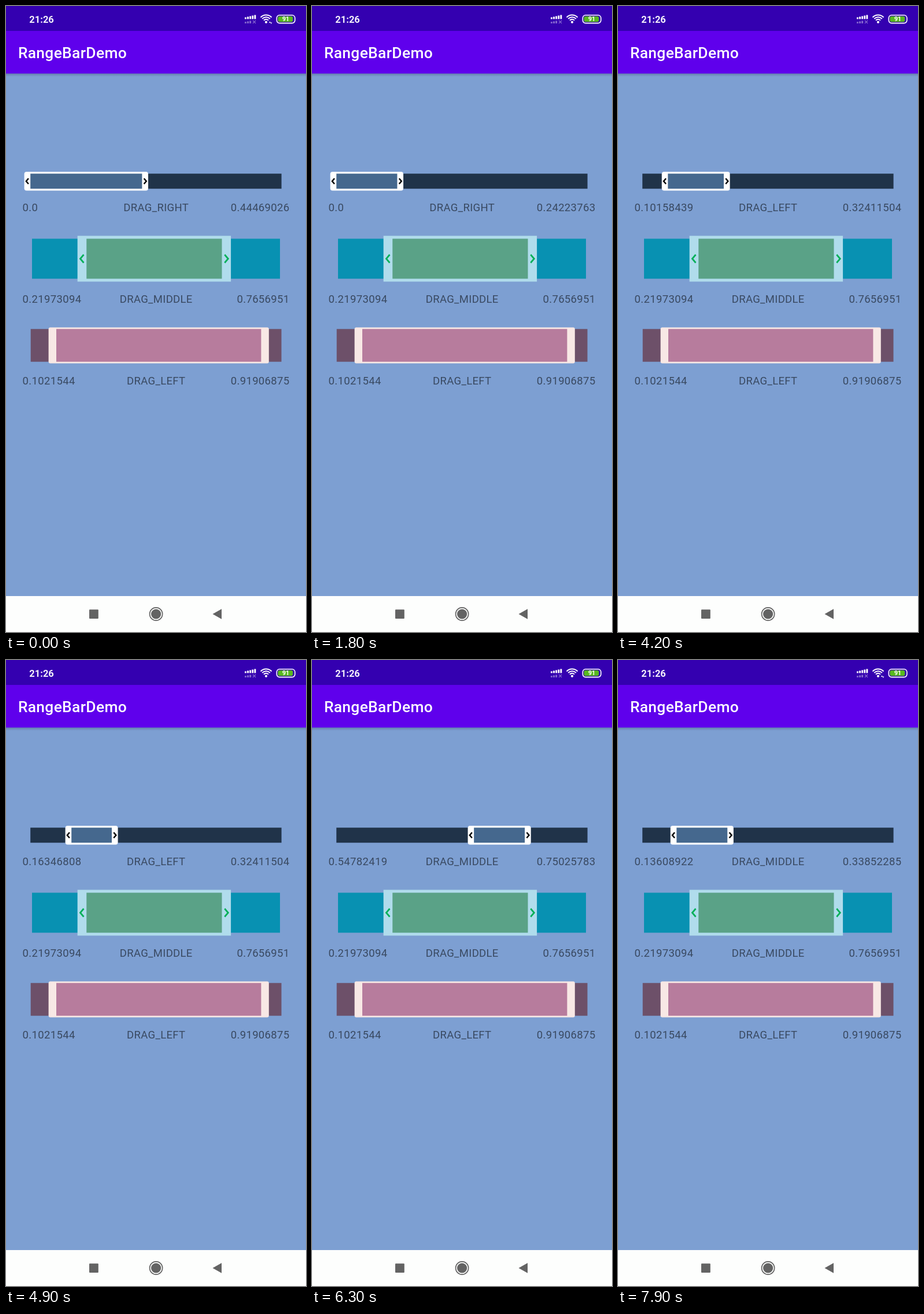
These frames come from a looping animation (519x1080 px, 8000 ms). An HTML page with a canvas:

```html
<!DOCTYPE html>
<html lang="en">
<head>
<meta charset="utf-8">
<title>RangeBarDemo</title>
<style>
html, body { margin: 0; width: 100%; height: 100%; overflow: hidden; background: #7d9fd2; }
canvas { display: block; width: 519px; height: 1080px; }
</style>
</head>
<body>
<canvas id="stage" width="519" height="1080"></canvas>
<script>
const ctx = document.getElementById('stage').getContext('2d');
const LOOP = 8000, STEP = 100;

// Drag path of the first bar: time, low value, high value
const PATH = [
  [0, 0, 0.44469026], [200, 0, 0.44469026],
  [900, 0, 1], [1000, 0, 1],
  [1800, 0, 0.24223763], [2050, 0, 0.17],
  [2700, 0, 0.40634075], [2950, 0, 0.44],
  [3500, 0, 0.32411504], [3600, 0, 0.32411504],
  [4200, 0.10158439, 0.32411504], [4750, 0.17, 0.32411504],
  [5400, 0.12168141, 0.32411504], [5700, 0.22761579, 0.43004942],
  [7000, 0.79756635, 1], [7200, 0.79756635, 1],
  [7900, 0.13608922, 0.33852285]
];

const BARS = [
  { x: 42.2, y: 289.3, w: 434.4, h: 25.9, track: '#203349', fill: '#45688e', frame: '#ffffff',
    grip: 10.6, edge: 3.3, radius: 4, arrow: { color: '#000', dx: 2, dy: 4.7, line: 2.5 }, text: 354 },
  { x: 45, y: 401.5, w: 429, h: 69, track: '#0891b2', fill: '#5aa287', frame: '#b0dcec',
    grip: 15.6, edge: 5, radius: 0, arrow: { color: '#00b058', dx: 3, dy: 7, line: 2.7 }, text: 511.7 },
  { x: 42.7, y: 557.3, w: 433.8, h: 56.4, track: '#6d5069', fill: '#b77c9d', frame: '#f8e8e5',
    grip: 13.4, edge: 2.9, radius: 3, text: 652.8 }
];

function slope(i, col) {
  const rate = k => (PATH[k + 1][col] - PATH[k][col]) / (PATH[k + 1][0] - PATH[k][0]);
  if (i === 0) return 0;
  if (i === PATH.length - 1) return rate(i - 1);
  const a = rate(i - 1), b = rate(i);
  return a * b > 0 ? 2 * a * b / (a + b) : 0;
}

// Monotone cubic through the path points
function valueAt(t, col) {
  let i = 0;
  while (i < PATH.length - 2 && t >= PATH[i + 1][0]) i++;
  const [a, b] = [PATH[i], PATH[i + 1]];
  const d = b[0] - a[0], u = (t - a[0]) / d, v = 1 - u;
  return a[col] * v * v * (1 + 2 * u) + b[col] * u * u * (3 - 2 * u)
    + d * u * v * (slope(i, col) * v - slope(i + 1, col) * u);
}

function rect(x, y, w, h, color, r = 0) {
  ctx.fillStyle = color;
  ctx.beginPath();
  ctx.roundRect(x, y, w, h, r);
  ctx.fill();
}

function line(points, color, width) {
  ctx.strokeStyle = color;
  ctx.lineWidth = width;
  ctx.beginPath();
  points.forEach(p => ctx.lineTo(...p));
  ctx.stroke();
}

function disc(x, y, r, color) {
  ctx.fillStyle = color;
  ctx.beginPath();
  ctx.arc(x, y, r, 0, 7);
  ctx.fill();
}

function polygon(points, color) {
  ctx.fillStyle = color;
  ctx.beginPath();
  points.forEach(p => ctx.lineTo(...p));
  ctx.fill();
}

function text(str, x, y, font, color, align = 'left', spacing = 0) {
  ctx.font = font + ' Roboto, sans-serif';
  ctx.letterSpacing = spacing + 'px';
  ctx.textAlign = align;
  ctx.fillStyle = color;
  ctx.fillText(str, x, y);
}

function format(v) {
  const n = +v.toFixed(8);
  return Number.isInteger(n) ? n.toFixed(1) : String(n);
}

function chevron(x, y, dir, { color, dx, dy, line: width }) {
  line([[x - dir * dx, y - dy], [x + dir * dx, y], [x - dir * dx, y + dy]], color, width);
}

function drawBar(bar, lo, hi, mode) {
  const { x, y, w, h, grip, edge, arrow } = bar;
  const left = x + lo * w, right = x + hi * w, mid = y + h / 2;
  rect(x, y, w, h, bar.track);
  rect(left - grip, y - edge, right - left + 2 * grip, h + 2 * edge, bar.frame, bar.radius);
  rect(left, y, right - left, h, bar.fill);
  if (arrow) {
    chevron(left - grip / 2, mid, -1, arrow);
    chevron(right + grip / 2, mid, 1, arrow);
  }
  const label = (str, tx, align) => text(str, tx, bar.text, '18.5px', '#394961', align, 0.33);
  label(format(lo), 28.6, 'left');
  label(mode, 259.7, 'center');
  label(format(hi), 490.5, 'right');
}

function drawStatus(dataArrows) {
  rect(0, 0, 519, 43, '#3400b0');
  text('21:26', 40.3, 29, 'bold 16.5px', '#f4f0fb');
  for (let i = 0; i < 5; i++) {
    const h = 3 + i;
    rect(413 + i * 4.1, 22.5 - h, 2.9, h, '#fff');
    if (i < 3) rect(413 + i * 4.1, 30 - h * 0.9, 2.9, h * 0.9, '#8466cf');
  }
  line([[427, 25], [432, 30]], '#8466cf', 1.3);
  line([[432, 25], [427, 30]], '#8466cf', 1.3);

  ctx.strokeStyle = '#fff';
  ctx.lineWidth = 2;
  for (const r of [5.5, 9.3, 13]) {
    ctx.beginPath();
    ctx.arc(450, 28.5, r, -Math.PI * 0.76, -Math.PI * 0.24);
    ctx.stroke();
  }
  disc(450, 27.8, 2.1, '#fff');
  if (dataArrows) {
    polygon([[455, 29], [456.6, 26.5], [458, 29]], '#fff');
    polygon([[457.3, 28.5], [460.3, 28.5], [458.8, 31]], '#fff');
  }

  ctx.lineWidth = 1.6;
  ctx.beginPath();
  ctx.roundRect(468.3, 15.8, 31.6, 13.8, 5);
  ctx.stroke();
  rect(470.3, 17.8, 26, 9.8, '#58b81f', 3);
  text('91', 484, 26.4, 'bold 10.5px', '#fff', 'center');
}

function drawChrome(t) {
  rect(0, 0, 519, 1080, '#7d9fd2');
  const shade = ctx.createLinearGradient(0, 116, 0, 122);
  shade.addColorStop(0, 'rgba(30,40,70,.28)');
  shade.addColorStop(1, 'rgba(30,40,70,0)');
  rect(0, 116, 519, 6, shade);
  rect(0, 43, 519, 73.6, '#5f00ec');
  drawStatus(t < 1400 || t >= 7200);
  text('RangeBarDemo', 20.9, 90.2, '500 26.4px', '#fff', 'left', 0.33);

  const gray = '#636363';
  rect(0, 1018, 519, 62, '#fdfefd');
  rect(144, 1041.3, 15.8, 15.8, gray, 1);
  disc(259.6, 1049, 8.6, gray);
  ctx.strokeStyle = gray;
  ctx.lineWidth = 1.6;
  ctx.beginPath();
  ctx.arc(259.6, 1049, 11.1, 0, 7);
  ctx.stroke();
  polygon([[357.5, 1049], [373, 1040.3], [373, 1057.8]], gray);
}

function render(now) {
  const t = Math.floor(now % LOOP / STEP) * STEP;
  const mode = t < 3700 ? 'DRAG_RIGHT' : t < 5500 ? 'DRAG_LEFT' : 'DRAG_MIDDLE';
  drawChrome(t);
  drawBar(BARS[0], valueAt(t, 1), valueAt(t, 2), mode);
  drawBar(BARS[1], 0.21973094, 0.7656951, 'DRAG_MIDDLE');
  drawBar(BARS[2], 0.1021544, 0.91906875, 'DRAG_LEFT');
}

const start = performance.now();
function tick() {
  render(performance.now() - start);
  requestAnimationFrame(tick);
}
tick();
</script>
</body>
</html>
```
